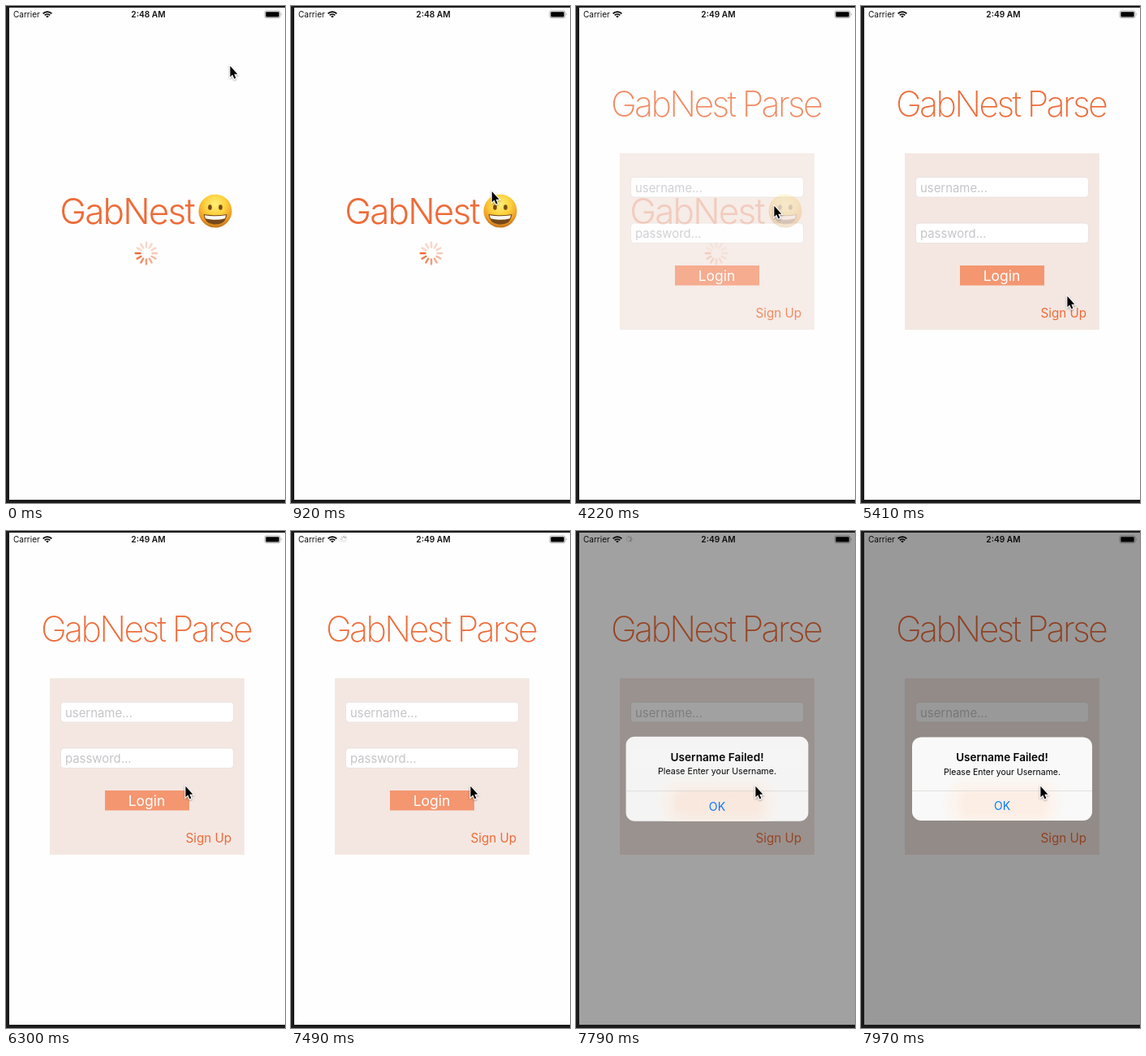
Animation of 344x611 px, one loop 8 s. Source, as an HTML page:

```html
<!DOCTYPE html>
<html lang="en">
<head>
<meta charset="utf-8">
<title>Login</title>
<style>
  html, body { margin: 0; width: 100%; height: 100%; overflow: hidden; background: #1b1b1c; }
  svg { display: block; width: 100%; height: 100%; font-family: Inter, Roboto, sans-serif; }
  .mid { text-anchor: middle; }
  .orange { fill: #ee6b38; }
  .field { fill: #fff; stroke: #e2dcda; stroke-width: .7; }
  .hint { fill: #c5c5c9; font-size: 14.9px; }
</style>
</head>
<body>
<svg viewBox="0 0 344 611">
  <defs>
    <radialGradient id="face" cx=".5" cy=".3" r=".72">
      <stop offset="0" stop-color="#fff07a"/>
      <stop offset=".45" stop-color="#fdd03c"/>
      <stop offset=".78" stop-color="#ee9c27"/>
      <stop offset="1" stop-color="#b86a1a"/>
    </radialGradient>
    <clipPath id="sheet"><rect x="63" y="253.5" width="222" height="102.5" rx="11"/></clipPath>
    <filter id="blur" x="-30%" y="-60%" width="160%" height="220%"><feGaussianBlur stdDeviation="4"/></filter>
    <filter id="shadow" x="-50%" y="-50%" width="200%" height="200%">
      <feDropShadow dx="0" dy="1" stdDeviation=".8" flood-opacity=".4"/>
    </filter>
  </defs>

  <rect x="4" y="2" width="340" height="605" fill="#fefefe"/>

  <g id="splash">
    <text class="mid orange" x="149" y="268" font-size="44" font-weight="350" letter-spacing="-1.8">GabNest</text>
    <circle cx="258" cy="252" r="20.5" fill="url(#face)"/>
    <g fill="#7a4a12">
      <ellipse cx="251.5" cy="247.5" rx="2.3" ry="3.3"/>
      <ellipse cx="264.5" cy="247.5" rx="2.3" ry="3.3"/>
    </g>
    <path d="M243.5 256Q258 258.5 272.5 256Q271 268.5 258 268.5Q245 268.5 243.5 256Z" fill="#74491a"/>
    <path d="M244.8 257.2Q258 259.5 271.2 257.2L270 261.2Q258 264.5 246 261.2Z" fill="#fbf8f0"/>
    <g id="loader" transform="translate(173 304)"></g>
  </g>

  <g id="login">
    <text class="mid orange" x="172.5" y="136" font-size="43" font-weight="200" letter-spacing="-2.7">GabNest Parse</text>
    <rect x="54" y="181" width="240" height="217" fill="#f4e7e2"/>
    <rect class="field" x="67.5" y="210.5" width="213" height="24.5" rx="4"/>
    <rect class="field" x="67.5" y="267" width="213" height="24.5" rx="4"/>
    <text class="hint" x="73" y="229">username...</text>
    <text class="hint" x="73" y="285">password...</text>
    <rect x="122" y="319" width="104" height="24.5" fill="#f49670"/>
    <text class="mid" x="173.5" y="338" font-size="17.5" fill="#fff">Login</text>
    <text class="orange" x="221.5" y="383" font-size="15.2">Sign Up</text>
  </g>

  <g id="status" fill="#111">
    <text x="9" y="14" font-size="10">Carrier</text>
    <g fill="none" stroke="#000" stroke-width="1.7">
      <path d="M45.6 9.3A7.6 7.6 0 0 1 56.4 9.3M47.7 11.4A4.6 4.6 0 0 1 54.3 11.4"/>
    </g>
    <path d="M51 14.6L49.2 12.7A2.6 2.6 0 0 1 52.8 12.7Z"/>
    <g id="network" transform="translate(65.2 10)"></g>
    <text id="clock" class="mid" x="175.5" y="14" font-size="10.2" font-weight="600"></text>
    <rect x="319" y="6" width="19" height="8.6" rx="2" fill="none" stroke="#999" stroke-width=".8"/>
    <rect x="320.3" y="7.2" width="16.4" height="6.2" rx="1" fill="#000"/>
    <path d="M339.2 8.8Q340.8 10.3 339.2 11.8Z" fill="#999"/>
  </g>

  <rect id="dim" x="4" y="2" width="340" height="605"/>

  <g id="alert">
    <g clip-path="url(#sheet)">
      <rect x="63" y="253" width="222" height="104" fill="#f9f9f9"/>
      <g filter="url(#blur)">
        <rect x="106" y="306" width="138" height="56" rx="24" fill="#fcf4ee"/>
        <rect x="122" y="318" width="108" height="34" rx="12" fill="#fceee4"/>
      </g>
      <path d="M63 319.5H285" stroke="#dcdad9" stroke-width=".8"/>
    </g>
    <g class="mid">
      <text x="174" y="283" font-size="13.5" font-weight="600">Username Failed!</text>
      <text x="174" y="299.5" font-size="10.5">Please Enter your Username.</text>
      <text x="174" y="343" font-size="14" fill="#0a7aff">OK</text>
    </g>
  </g>

  <g id="cursor">
    <path d="M.4 .8V14.2L3.3 11.5L5.5 16.4L7.4 15.6L5.3 10.7H9.4Z"
          stroke="#fff" stroke-width="2" paint-order="stroke" filter="url(#shadow)"/>
  </g>
</svg>

<script>
const LOOP = 8000;
const $ = id => document.getElementById(id);
const show = (id, on) => $(id).style.display = on ? '' : 'none';

// Spokes fade counterclockwise behind the leading one.
function spokes(count, inner, outer, width, color, head) {
  let lines = '';
  for (let i = 0; i < count; i++) {
    const angle = (head - i) * 360 / count;
    const opacity = Math.max(.27, 1 - i * 1.3 / count);
    lines += `<path d="M0 ${-inner}V${-outer}" transform="rotate(${angle})" opacity="${opacity}"/>`;
  }
  return `<g stroke="${color}" stroke-width="${width}" stroke-linecap="round">${lines}</g>`;
}

// Each move: time of first step, time of last step, number of steps, destination.
const start = [276, 73];
const moves = [
  [450, 1070, 5, 244, 245],
  [4810, 5410, 5, 254, 356],
  [5560, 5710, 2, 210, 337],
  [6000, 6300, 3, 221, 313],
];

function cursorAt(t) {
  let [x, y] = start;
  for (const [first, last, steps, toX, toY] of moves) {
    if (t < first) break;
    const done = 1 + Math.floor((t - first) / (last - first) * (steps - 1) + 1e-6);
    const p = Math.min(1, done / steps);
    const eased = p * p * (3 - 2 * p);
    x += (toX - x) * eased;
    y += (toY - y) * eased;
  }
  return [x, y];
}

function draw(t) {
  show('splash', t < 4360);
  show('login', t >= 4220);
  $('login').style.opacity = t < 4360 ? .78 : 1;
  $('clock').textContent = t < 2120 ? '2:48 AM' : '2:49 AM';

  show('network', t >= 6450 && t < 7970);
  $('network').innerHTML = spokes(8, 2.2, 3.8, .9, '#555', Math.floor(t / 150));

  const alerting = t >= 7640;
  show('dim', alerting);
  show('alert', alerting);
  const unsettled = t < 7790 ? 1 : t < 7970 ? .25 : 0;
  $('dim').style.opacity = .4 - .12 * unsettled;
  $('alert').style.opacity = 1 - .16 * unsettled;
  $('alert').setAttribute('transform',
    `translate(174 304.7) scale(${1 + .059 * unsettled}) translate(-174 -304.7)`);

  $('cursor').setAttribute('transform', `translate(${cursorAt(t)})`);
}

$('loader').innerHTML = spokes(12, 7.5, 13.2, 2.4, '#ee6b38', 9);

function tick(now) {
  draw(now % LOOP);
  requestAnimationFrame(tick);
}
draw(0);
requestAnimationFrame(tick);
</script>
</body>
</html>
```
